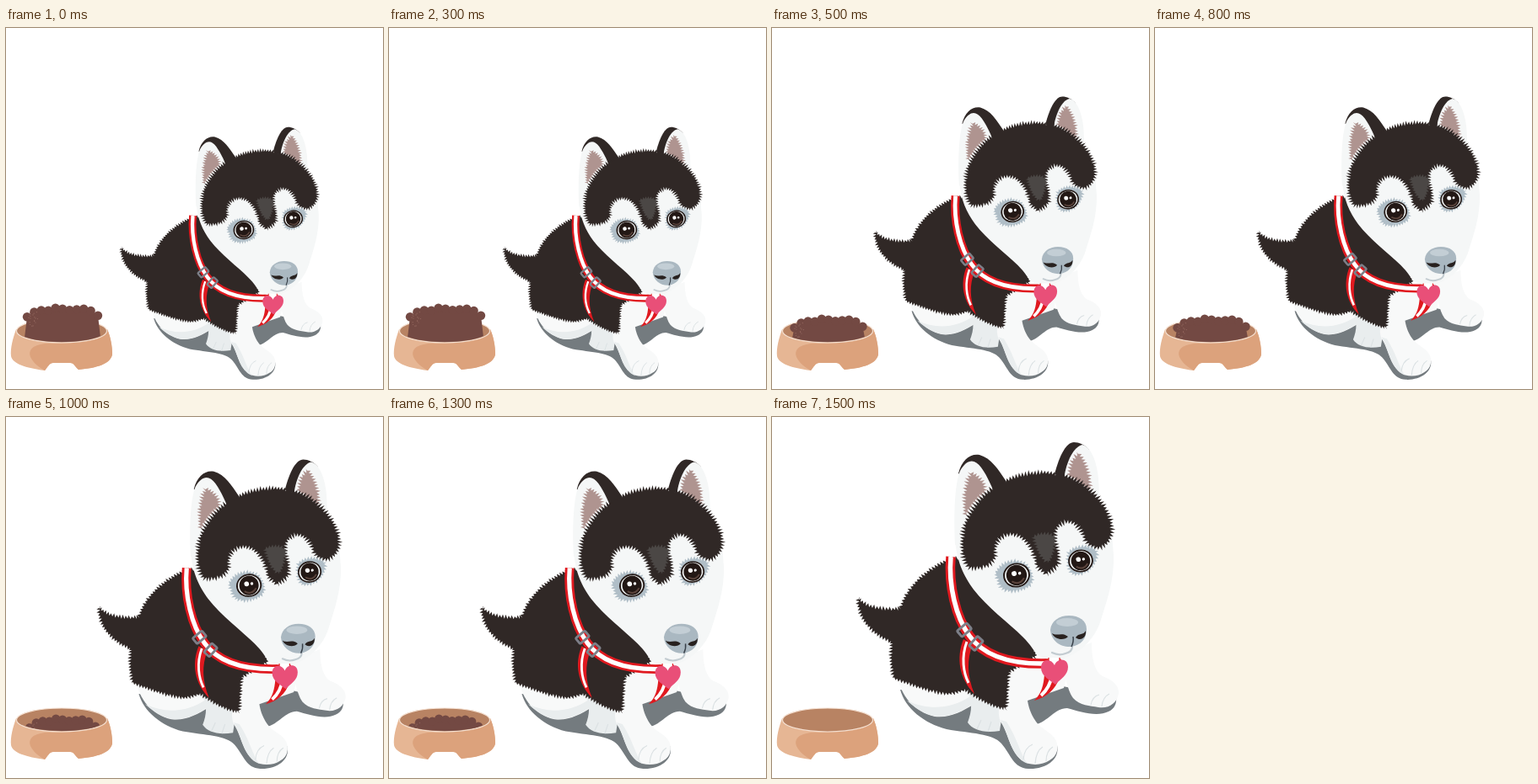
These frames come from a looping animation (447x429 px, 2000 ms). An HTML page:

```html
<!DOCTYPE html>
<html lang="en">
<head>
<meta charset="utf-8">
<title>Growing puppy</title>
<style>
  html, body { margin: 0; width: 100%; height: 100%; overflow: hidden; background: #fff; }
  svg { display: block; width: 100%; height: 100%; }
</style>
</head>
<body>
<svg viewBox="0 0 447 429">
  <defs>
    <clipPath id="inBowl">
      <path d="M0 300H132V359H119C119 367 95 373 66 373S13 367 13 359H0Z"/>
    </clipPath>
    <g id="eye">
      <ellipse rx="16" ry="14.5" fill="#231815"/>
      <ellipse rx="14" ry="12.7" fill="#f5f8f8"/>
      <circle r="12.2" fill="#231815"/>
      <path d="M-7 6Q1 13 8 5" fill="none" stroke="#5b443c" stroke-width="2"/>
      <circle cx="-2.5" cy="-2.5" r="3" fill="#fff"/>
      <circle cx="4" cy="-1.5" r="1.8" fill="#fff"/>
    </g>
    <rect id="buckle" x="-7.5" y="-4.5" width="15" height="9" rx="1.5" fill="none" stroke="#7d7f88" stroke-width="3"/>
    <path id="strap" d="M212 166C209 200 218 238 234 260C251 284 285 297 343 292" fill="none"/>
  </defs>

  <g id="bowl">
    <path fill="#e6b694" d="M12 358C8 369 5 381 6 390C8 399 23 404 46 407C49 404 51 398 56 398H76C81 398 82 403 86 406C108 404 124 399 126 388C126 378 124 367 120 358Z"/>
    <path fill="#dca27c" d="M46 375C31 377 26 383 29 391C33 399 39 403 46 407C49 404 51 398 56 398H76C81 398 82 403 86 406C108 404 124 399 126 388C126 378 124 367 120 358C114 370 83 376 46 375Z"/>
    <ellipse cx="66" cy="360" rx="53.5" ry="14" fill="#b88363" stroke="#f4dfd0" stroke-width="1.2"/>
    <g id="food" clip-path="url(#inBowl)" fill="#734943"></g>
  </g>

  <g id="dog">
    <g id="shadow" fill="#747b7f">
      <path d="M152 324C158 346 180 364 207 371C235 376 262 376 272 388C284 402 286 417 304 418C323 419 342 408 338 390L311 366C328 362 335 346 350 346C365 350 385 357 399 350C406 347 409 340 408 333L345 320L270 338Z"/>
    </g>

    <g id="legs">
      <path fill="#f8f9f9" d="M148 306C153 332 168 350 193 356C211 358 225 350 240 341L237 318Z"/>
      <path fill="#e9edee" d="M160 337C174 350 187 355 197 356C213 356 226 349 238 341L235 332C213 347 185 349 160 337Z"/>
      <path fill="#e9edee" d="M229 322C239 336 237 350 232 363C238 372 251 376 270 373L275 340Z"/>
      <path fill="#f8f9f9" d="M337 285C349 304 349 323 357 334C365 343 377 343 387 345C399 347 409 340 411 329C412 319 403 312 392 308C383 303 379 288 379 268Z"/>
      <path fill="#f8f9f9" d="M276 292C277 331 264 344 271 362C281 377 281 395 296 408C305 415 321 414 329 408C339 403 340 392 337 385C333 375 319 371 313 362C306 352 304 343 303 337L346 322L356 280Z"/>
      <path fill="#eaeeef" d="M271 360C281 377 281 395 296 408L303 412C294 400 291 382 278 362Z"/>
      <path fill="none" stroke="#dbe1e3" stroke-width="1.2" d="M243 371L248 360M256 374L260 362M378 342Q380 332 388 330M391 344Q392 333 400 329M298 407Q299 393 309 389M312 412Q313 397 321 392M325 409Q325 397 333 392"/>
    </g>

    <path data-fur="4" fill="#302826" d="M213 168C186 179 160 200 152 228C135 229 110 228 102 214C100 237 118 259 142 267C140 284 141 300 145 311C168 318 188 328 212 329L229 324C243 334 262 345 278 347C279 330 280 315 281 303L314 284L290 225L224 168Z"/>

    <g id="harness">
      <path fill="#e0191f" d="M227 264C218 286 222 311 240 329C231 307 231 288 238 270Z"/>
      <path fill="none" stroke="#fff" stroke-width="3" d="M231 267C224 286 227 304 233 316"/>
      <path fill="#e0191f" d="M311 337C320 328 322 318 323 306L341 309C336 325 325 333 311 337Z"/>
      <path fill="none" stroke="#fff" stroke-width="4" d="M332 306Q330 321 319 331"/>
      <use href="#strap" stroke="#e0191f" stroke-width="11.5"/>
      <use href="#strap" stroke="#fff" stroke-width="5.5"/>
      <use href="#buckle" transform="translate(228 253) rotate(-40)"/>
      <use href="#buckle" transform="translate(242 269) rotate(-48)"/>
    </g>

    <g id="head">
      <path fill="#302826" d="M221 67C225 51 235 43 246 45C260 49 268 62 278 77L262 96Z"/>
      <path fill="#302826" d="M335 68C341 45 349 30 358 30C364 30 371 33 376 39L355 76Z"/>
      <path fill="#f5f7f7" d="M217 152C215 113 217 78 223 64C231 50 240 49 248 60C256 71 261 84 267 98L246 155Z"/>
      <path fill="#f5f7f7" d="M346 74C349 52 358 35 368 33C379 36 385 54 387 73C388 87 388 98 387 109L365 100Z"/>
      <path data-fur="5" fill="#af9490" d="M236 66C247 71 254 80 253 88L240 100L229 117C227 100 228 80 236 66Z"/>
      <path data-fur="5" fill="#af9490" d="M364 43C373 55 378 72 377 87C367 82 360 73 352 71C352 60 356 48 364 43Z"/>
      <path fill="#f5f7f7" d="M217 145C219 172 227 188 239 205C255 226 281 245 297 261C307 271 311 278 314 283C327 289 338 290 348 286C368 279 384 261 390 241C397 218 406 194 405 164L402 128L345 90L255 100Z"/>
      <path data-fur="5.5" fill="#302826" d="M277 76C300 64 335 62 362 75C389 92 405 118 403 138C400 149 394 155 386 156C378 154 373 151 371 146C367 131 359 124 350 124C337 125 333 138 337 152C341 164 341 172 338 178L325 187L314 178C311 158 301 140 284 139C270 140 262 149 265 163C265 174 254 180 234 180C223 170 222 137 234 116C244 98 258 84 277 76Z"/>
      <path data-fur="4" fill="#4b4745" d="M310 142Q323 135 336 142Q335 160 328 173Q317 170 310 142Z"/>

      <path data-fur="4" fill="#b0bec7" d="M265 186C270 173 285 167 300 174C309 182 310 192 308 198C298 208 280 210 271 203Z"/>
      <path data-fur="4" fill="#b0bec7" d="M352 160C362 151 378 152 386 160C385 178 372 189 356 187C350 180 349 168 352 160Z"/>
      <use href="#eye" transform="translate(290 188) rotate(-12)"/>
      <use href="#eye" transform="translate(366 171) rotate(-12) scale(.93)"/>

      <path fill="none" stroke="#c3ccd1" stroke-width="2.2" stroke-linecap="round" d="M356 273Q356 279 348 281Q340 284 332 280"/>
      <path fill="#aab8c1" d="M330 253C331 242 341 236 352 236C364 236 373 242 373 252C373 264 366 271 355 273C342 274 331 266 330 253Z"/>
      <ellipse cx="350" cy="244" rx="13" ry="5" fill="#c3ced5"/>
      <path fill="#28211f" d="M332 257C338 261 344 255 351 261C347 266 335 265 332 257ZM360 262C364 256 369 260 372 254C373 262 366 267 360 262Z"/>
      <path fill="none" stroke="#39414a" stroke-width="1.5" d="M357 261Q358 267 355 273"/>
    </g>

    <path fill="#fff" stroke="#e0191f" stroke-width="1.2" d="M328 286V297H341V286"/>
    <path fill="#e94f78" d="M336 318C330 313 319 308 319 298C319 287 331 286 335 295C338 286 351 286 351 297C351 307 342 311 336 318Z"/>
  </g>
</svg>

<script>
const STEP = 500, STAGES = 4, TOOTH_GAP = 3.8;
const dog = document.getElementById("dog");
const food = document.getElementById("food");

const noise = n => { const v = Math.sin(n * 91.7) * 4371.3; return v - Math.floor(v); };
const dot = (x, y, r) => `<circle cx="${x.toFixed(1)}" cy="${y.toFixed(1)}" r="${r}"/>`;

// Turns a smooth closed outline into pointed tufts centred on it
function addFur(path) {
  const height = Number(path.dataset.fur);
  const total = path.getTotalLength();
  const count = Math.round(total / TOOTH_GAP);
  const spots = Array.from({ length: count }, (_, i) => path.getPointAtLength(total * i / count));
  const next = i => spots[(i + 1) % count];
  const area = spots.reduce((sum, p, i) => sum + p.x * next(i).y - next(i).x * p.y, 0);
  const side = Math.sign(area);

  const teeth = spots.map((p, i) => {
    const q = next(i), dx = q.x - p.x, dy = q.y - p.y;
    const d = Math.hypot(dx, dy) || 1;
    const nx = side * dy / d, ny = -side * dx / d;
    const at = (along, out) =>
      `${(p.x + dx * along + nx * out).toFixed(1)} ${(p.y + dy * along + ny * out).toFixed(1)}`;
    const h = height * (0.6 + 0.8 * noise(i + 1));
    return at(0, -h * 0.4) + "L" + at(0.7, h * 0.6);
  });
  path.setAttribute("d", "M" + teeth.join("L") + "Z");
}

// A heap of kibble that sinks and narrows with every stage
function heap(stage) {
  const lumps = 11, half = 42 - 1.5 * stage;
  const tops = Array.from({ length: lumps }, (_, i) => {
    const u = 2 * i / (lumps - 1) - 1;
    return [67 + u * half, 332 + 13 * stage + 9 * u ** 4 + 4 * noise(i + 5)];
  });
  let specks = "";
  for (let i = 0; i < 18; i++)
    specks += dot(27 + 12 * noise(i + 3), tops[1][1] + 20 * noise(i + 40), 0.6);
  return `<g><path d="M${67 - half - 4} 376L${tops.join("L")}L${67 + half + 4} 376Z"/>
    ${tops.map(([x, y]) => dot(x, y, 5.2)).join("")}<g fill="#94685f">${specks}</g></g>`;
}

document.querySelectorAll("[data-fur]").forEach(addFur);
food.innerHTML = [0, 1, 2].map(heap).join("");

function draw(time) {
  const stage = Math.floor(time / STEP) % STAGES;
  const left = 1 - stage / (STAGES - 1);
  const size = 1 - 0.227 * left ** 1.32;
  dog.setAttribute("transform", `translate(254 417) scale(${size}) translate(-254 -417)`);
  [...food.children].forEach((pile, i) =>
    pile.setAttribute("display", i === stage ? "inline" : "none"));
}

const start = performance.now();
function tick(now) {
  draw(Math.max(0, now - start));
  requestAnimationFrame(tick);
}
draw(0);
requestAnimationFrame(tick);
</script>
</body>
</html>
```
